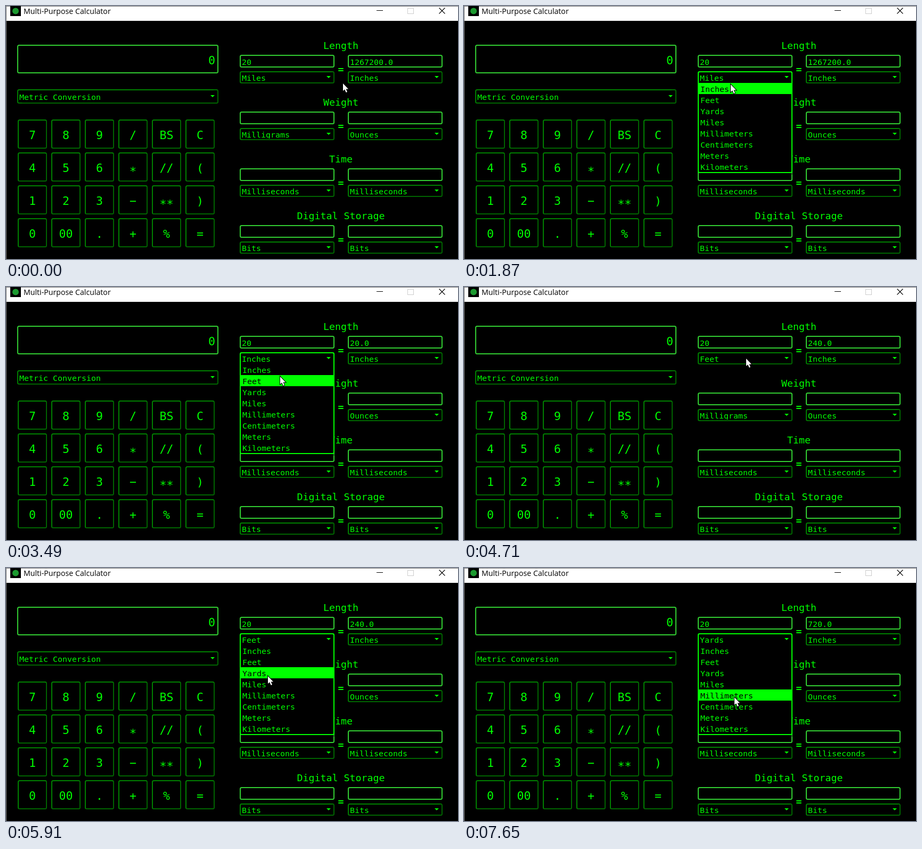
An HTML page for the animation above (8000 ms loop, 849 by 477 pixels).

```html
<!DOCTYPE html>
<html lang="en">
<head>
<meta charset="utf-8">
<title>Multi-Purpose Calculator</title>
<style>
html, body { margin: 0; width: 100%; height: 100%; overflow: hidden; background: #000; }
svg { display: block; width: 849px; height: 477px; }
text { font: 14.95px "DejaVu Sans Mono", monospace; fill: #0f0; white-space: pre; }
text.head { font-size: 18.27px; text-anchor: middle; }
text.equals { font-weight: 700; }
text.key { font-size: 21.6px; text-anchor: middle; }
text.title { font: 14.2px "Open Sans", sans-serif; fill: #000; }
</style>
</head>
<body>
<svg id="stage" viewBox="0 0 849 477">
  <defs>
    <linearGradient id="bevel" x1="0" y1="0" x2="1" y2="1">
      <stop offset=".5" stop-color="#008000"/>
      <stop offset=".5" stop-color="#006400"/>
    </linearGradient>
  </defs>
</svg>
<script>
const stage = document.getElementById('stage');
const LIME = '#0f0', FIELD = '#32cd32', BEVEL = 'url(#bevel)';

function add(tag, attrs, parent = stage) {
  const el = document.createElementNS('http://www.w3.org/2000/svg', tag);
  for (const key in attrs) el.setAttribute(key, attrs[key]);
  return parent.appendChild(el);
}
function label(str, x, y, cls = '', parent = stage) {
  const el = add('text', { x, y, class: cls }, parent);
  el.textContent = str;
  return el;
}
function fill(x, y, width, height, color, parent = stage) {
  return add('rect', { x, y, width, height, fill: color }, parent);
}
function box(x, y, w, h, stroke, parent = stage) {
  add('rect', { x: x + 1, y: y + 1, width: w - 2, height: h - 2, rx: 2.5,
    fill: 'none', stroke, 'stroke-width': 2 }, parent);
}
function combo(str, x, y, w, h) {
  const text = label(str, x + 4, y + Math.floor(h / 2) + 7);
  fill(x + 2, y + h - 3, w - 4, 3, '#000'); // clips descenders
  box(x, y, w, h, BEVEL);
  add('path', { d: `M${x + w - 15} ${y + h / 2 - 2.5}h8l-4 4z`, fill: LIME });
  return text;
}
function field(str, x, y) {
  box(x, y, 178, 24, FIELD);
  return label(str, x + 4, y + 19);
}

// Window frame
fill(0, 0, 849, 477, '#000');
fill(0, 0, 849, 28, '#fff');
fill(0, 0, 849, 1, '#777');
fill(0, 0, 1, 477, '#777');
fill(8, 0, 20, 19, '#000');
add('circle', { cx: 18, cy: 9.5, r: 6, fill: '#1c9a30' });
label('Multi-Purpose Calculator', 33, 15, 'title');
fill(696, 8, 12, 1, '#000');
add('rect', { x: 754.5, y: 4.5, width: 11, height: 10, fill: 'none', stroke: '#ccc' });
add('path', { d: 'M813.5 3.5l11 11m0-11l-11 11', stroke: '#000', 'stroke-width': 1.1 });

// Calculator
box(21, 73, 378, 54, FIELD);
label('0', 393, 110, 'key').style.textAnchor = 'end';
combo('Metric Conversion', 21, 157, 378, 27);
['7 8 9 / BS C', '4 5 6 * // (', '1 2 3 − ** )', '0 00 . + % ='].forEach((row, r) =>
  row.split(' ').forEach((key, c) => {
    const x = 22 + 63 * c, y = 214 + 62 * r;
    box(x, y, 55, 55, BEVEL);
    label(key, x + 27.5, y + (key[0] === '*' ? 43 : 37), 'key');
  }));

// Converters
const [{ result, unit }] = [
  ['Length', 'Miles', 'Inches'],
  ['Weight', 'Milligrams', 'Ounces'],
  ['Time', 'Milliseconds', 'Milliseconds'],
  ['Digital Storage', 'Bits', 'Bits'],
].map(([name, from, to], i) => {
  const y = 107 * i;
  label(name, 629, y + 81, 'head');
  label('=', 629, y + 126, 'head equals');
  field(i ? '' : '20', 439, y + 92);
  const result = field('', 642, y + 92);
  const unit = combo(from, 439, y + 123, 178, 23);
  combo(to, 642, y + 123, 178, 23);
  return { result, unit };
});

// Drop-down list
const TOP = 145, ROW = 21;
const units = ['Inches', 'Feet', 'Yards', 'Miles', 'Millimeters', 'Centimeters', 'Meters', 'Kilometers'];
const inches = [1, 12, 36, 63360];
const popup = add('g', {});
add('path', { d: 'M617 127h4v191H443v-3h174z', opacity: .3 }, popup);
fill(440, TOP - 2, 176, 171, '#000', popup);
const bar = fill(441, TOP, 175, ROW, LIME, popup);
const items = units.map((name, i) => label(name, 444, TOP + 17 + ROW * i, '', popup));
box(439, 123, 178, 192, LIME, popup);

const pointer = add('path', { d: 'M0 0V14L3.2 11.2 5.7 17 8 16 5.6 10.4H10Z',
  fill: '#fff', stroke: '#000', 'stroke-width': 2, 'paint-order': 'stroke' });

// Pointer moves: begin, end, x, y reached
const moves = [
  [0, 560, 535, 138], [700, 1260, 502, 158], [1720, 1870, 501, 148],
  [2490, 2940, 517, 139], [3250, 3490, 515, 169], [3750, 4430, 530, 135],
  [4860, 5640, 492, 204], [6160, 6710, 528, 138], [7140, 7650, 508, 244],
];
// List visits: opened, closed, unit selected meanwhile
const visits = [[700, 2490, 3], [3250, 3880, 0], [4860, 6300, 1], [7140, 8000, 2]];
const REFRESH = 130;

function pointerAt(t) {
  let x = 633, y = 146;
  for (const [begin, end, toX, toY] of moves) {
    if (t < begin) break;
    const steps = Math.round((end - begin) / REFRESH);
    const k = Math.min(1, Math.floor((t - begin) / (end - begin) * steps) / steps);
    x += (toX - x) * k;
    y += (toY - y) * k;
  }
  return [Math.round(x), Math.round(y)];
}

function draw(t) {
  const [x, y] = pointerAt(t);
  const [opened, , selected] = visits.find(visit => t < visit[1]);
  const hot = y >= TOP ? Math.floor((y - TOP) / ROW) : selected;

  unit.textContent = units[selected];
  result.textContent = (20 * inches[selected]).toFixed(1);
  popup.style.display = t >= opened ? '' : 'none';
  bar.setAttribute('y', TOP + ROW * hot);
  items.forEach((item, i) => item.style.fill = i === hot ? '#000' : LIME);
  pointer.setAttribute('transform', `translate(${x} ${y})`);
}

const start = performance.now();
function loop() {
  draw((performance.now() - start) % 8000);
  requestAnimationFrame(loop);
}
loop();
</script>
</body>
</html>
```
